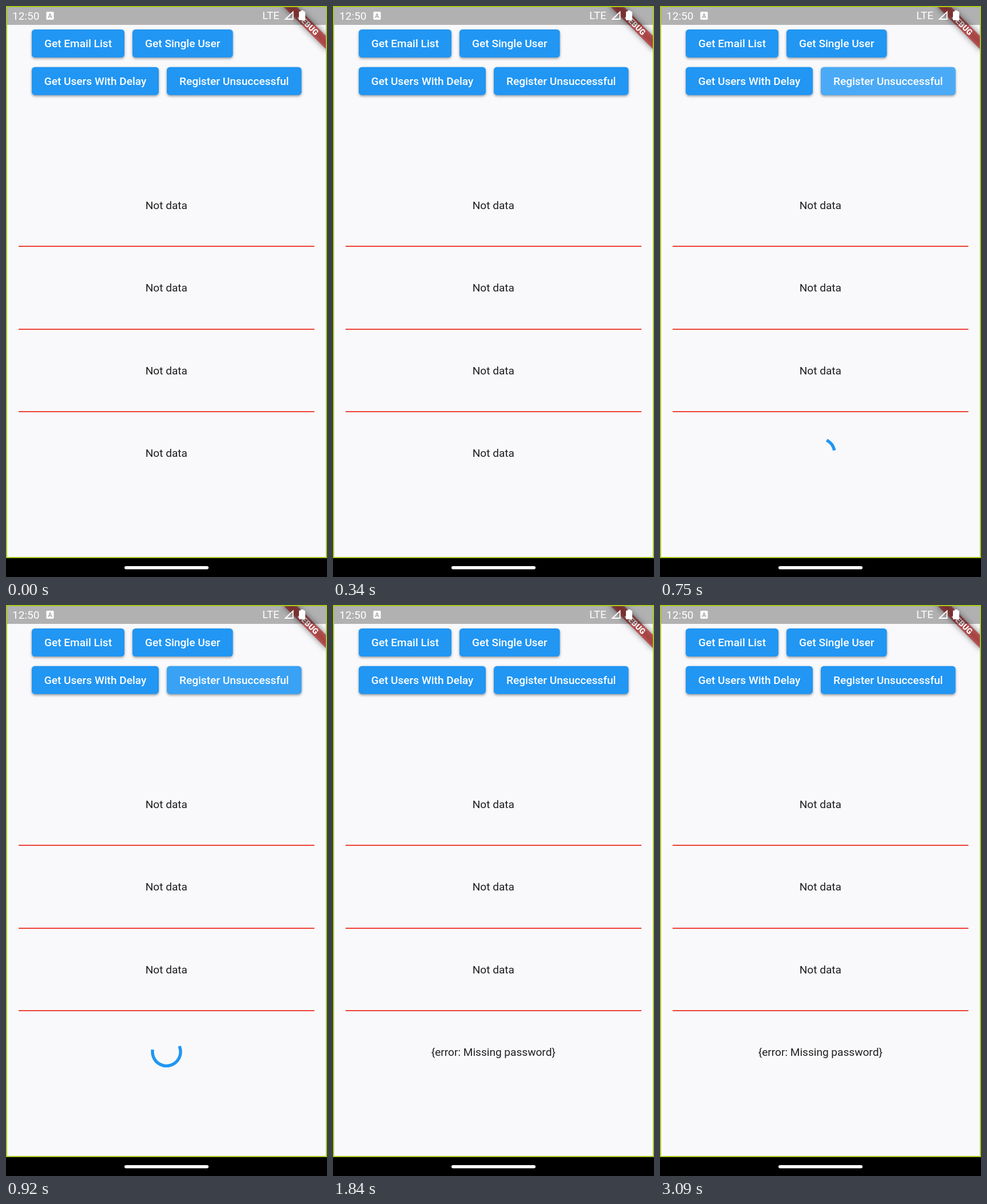
Recreate the animation shown at these times as an HTML page with a canvas. Size 561x998 px, loop 3140 ms.

```html
<!DOCTYPE html>
<html lang="en">
<head>
<meta charset="utf-8">
<title>Request demo</title>
<style>
  html, body { margin: 0; width: 100%; height: 100%; overflow: hidden; background: #000; }
  canvas { display: block; }
</style>
</head>
<body>
<canvas id="stage" width="561" height="998"></canvas>
<script>
const ctx = document.getElementById('stage').getContext('2d');
const W = 561, H = 998, LOOP = 3140, STEP = 1000 / 24;
const DP = 15 / 11;                 // pixels per layout unit
const TAU = Math.PI * 2;
const FONT = `${14 * DP}px Roboto, sans-serif`;
const SPIN_START = 617, SPIN_RATE = 1.055, REPLY = 1540;
const BUTTONS = [
  ['Get Email List', 45, 41, 162],
  ['Get Single User', 221, 41, 175.5],
  ['Get Users With Delay', 45, 106.7, 222],
  ['Register Unsuccessful', 281, 106.7, 235.5],
];

const clamp = v => Math.min(1, Math.max(0, v));
const ramp = (t, from, to) => clamp((t - from) / (to - from));

// cubic-bezier(0.4, 0, 0.2, 1)
function ease(x) {
  if (x <= 0 || x >= 1) return clamp(x);
  let lo = 0, hi = 1, s = 0.5;
  for (let i = 0; i < 24; i++) {
    s = (lo + hi) / 2;
    const bx = 1.2 * s * (1 - s) ** 2 + 0.6 * s * s * (1 - s) + s ** 3;
    if (bx < x) lo = s; else hi = s;
  }
  return 3 * s * s * (1 - s) + s ** 3;
}

function rect(x, y, w, h, color) {
  ctx.fillStyle = color;
  ctx.fillRect(x, y, w, h);
}

function roundRect(x, y, w, h, r, color) {
  ctx.beginPath();
  ctx.roundRect(x, y, w, h, r);
  ctx.fillStyle = color;
  ctx.fill();
}

function text(str, x, y, color, align = 'center', font = FONT) {
  ctx.font = font;
  ctx.textAlign = align;
  ctx.fillStyle = color;
  ctx.fillText(str, x, y);
}

function withShadow(color, blur, dy, draw) {
  ctx.save();
  ctx.shadowColor = color;
  ctx.shadowBlur = blur;
  ctx.shadowOffsetY = dy;
  draw();
  ctx.restore();
}

function button([label, x, y, w]) {
  const h = 49;
  withShadow('rgba(0,0,0,.38)', 4.5, 2, () => roundRect(x, y, w, h, 5.5, '#2196f3'));
  text(label, x + w / 2, y + 31.4, '#fff', 'center', '500 ' + FONT);
}

function ripple(t, [, x, y, w]) {
  const fade = 1 - ramp(t, 840, 1010);
  if (t < 580 || fade === 0) return;
  ctx.save();
  ctx.beginPath();
  ctx.roundRect(x, y, w, 49, 5.5);
  ctx.clip();
  rect(x, y, w, 49, `rgba(255,255,255,${0.08 * ramp(t, 580, 700) * fade})`);
  ctx.beginPath();
  ctx.arc(x + w / 2, y + 24, 15 + 110 * ease(ramp(t, 580, 800)), 0, TAU);
  ctx.fillStyle = `rgba(255,255,255,${0.12 * fade})`;
  ctx.fill();
  ctx.restore();
}

function spinner(elapsed) {
  const phase = elapsed / 1333 % 1;
  const head = ease(clamp(phase * 2)) * 0.75;
  const tail = ease(clamp(phase * 2 - 1)) * 0.75;
  const start = TAU * (tail - 0.25 + elapsed / 2222 % 1 + phase / 4);
  const sweep = Math.max(TAU * (head - tail), 0.001);
  ctx.beginPath();
  ctx.arc(280.5, 781, 18 * DP, start, start + sweep);
  ctx.strokeStyle = '#2196f3';
  ctx.lineWidth = 4 * DP;
  ctx.lineCap = 'square';
  ctx.stroke();
}

function debugBanner() {
  ctx.save();
  ctx.translate(W, 0);
  ctx.rotate(Math.PI / 4);
  const box = [-40 * DP, 28 * DP, 80 * DP, 12 * DP];
  // Only the shadow lands on the stage: its caster is drawn far off to the right.
  ctx.save();
  ctx.shadowColor = 'rgba(0,0,0,.5)';
  ctx.shadowBlur = 10.8;
  ctx.shadowOffsetX = -2000;
  ctx.translate(2000 * Math.SQRT1_2, -2000 * Math.SQRT1_2);
  rect(...box, '#000');
  ctx.restore();
  rect(...box, 'rgba(183,28,28,.627)');
  text('DEBUG', 0, 34 * DP + 5, '#fff', 'center', `900 ${10.2 * DP}px Roboto, sans-serif`);
  ctx.restore();
}

function statusBar() {
  rect(0, 0, W, 33, 'rgba(0,0,0,.29)');
  text('12:50', 11, 24, '#fff', 'left');
  text('LTE', 448, 23, '#fff', 'left');

  roundRect(70.5, 10, 13, 14, 1.5, '#fff');
  text('A', 77, 21, '#aaa', 'center', 'bold 11px Roboto, sans-serif');

  ctx.beginPath();
  ctx.moveTo(488.5, 23);
  ctx.lineTo(501.5, 10.5);
  ctx.lineTo(501.5, 23);
  ctx.closePath();
  ctx.strokeStyle = '#fff';
  ctx.lineWidth = 2;
  ctx.lineCap = 'butt';
  ctx.stroke();

  roundRect(512, 9.5, 11, 15.5, 1.2, '#fff');
  rect(515, 7.8, 5, 2.5, '#fff');
}

function draw(t) {
  rect(0, 0, W, H, '#f9f9fb');
  BUTTONS.forEach(button);
  ripple(t, BUTTONS[3]);

  for (let i = 0; i < 3; i++) {
    text('Not data', 280.3, 354.7 + 144.5 * i, '#1f1f20');
    rect(22, Math.round(419 + 144.5 * i), 517, 2, '#ee4337');
  }
  if (t >= REPLY) text('{error: Missing password}', 280.3, 788.2, '#1f1f20');
  else if (t >= SPIN_START) spinner((t - SPIN_START) * SPIN_RATE);
  else text('Not data', 280.3, 788.2, '#1f1f20');

  debugBanner();
  statusBar();

  ctx.strokeStyle = '#a9c91c';
  ctx.lineWidth = 2;
  ctx.strokeRect(1, 1, W - 2, 963);
  rect(0, 965, W, 33, '#000');
  roundRect(207, 979, 147, 5.5, 2.75, '#fff');
}

function frame() {
  const t = performance.now() % LOOP;
  draw(Math.floor((t + 5) / STEP) * STEP);
  requestAnimationFrame(frame);
}
frame();
</script>
</body>
</html>
```
